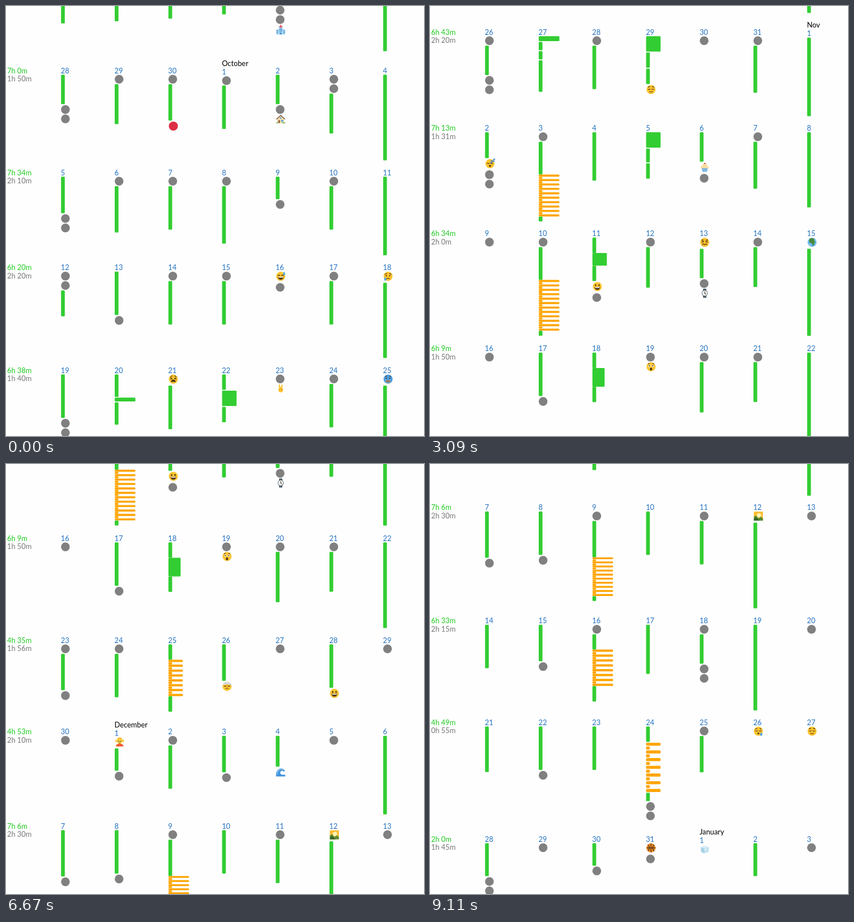
Animation, 738 px wide and 759 px high, one loop 9.21 s. Source, as an HTML page:

```html
<!DOCTYPE html>
<html lang="en">
<head>
<meta charset="utf-8">
<title>Training calendar</title>
<style>
  html, body { margin: 0; width: 100%; height: 100%; overflow: hidden; background: #fefefe; }
  svg { display: block; width: 738px; height: 759px; }
  text { font: 12.8px Lato, sans-serif; fill: #000; }
  .total { fill: #1fcb1f; }
  .extra { fill: #777; }
  .day { fill: #2472c0; }
  .run { fill: #32cd32; }
  .interval { fill: #ffa500; }
  .dot { fill: #808080; }
  .red { fill: #dd2e44; }
  .ink { fill: none; stroke: #4a2f12; stroke-width: 1.1; stroke-linecap: round; stroke-linejoin: round; }
  .mouth { fill: #4a2f12; }
  .drop { fill: #4aa5ee; }
</style>
</head>
<body>
<svg viewBox="0 0 738 759"><g id="calendar"></g></svg>
<script>
const LOOP = 9210;
const COLUMN_X = 97.2, COLUMN_STEP = 94.78;
const BAR_WIDTH = 6.6, GAP = 1.4;

// Each row: y | run total | extra total | first day | seven cells.
// In a cell: minutes[*width], a trailing "-" drops the gap,
// count~pitch~width is a stack of intervals, words are symbols.
const weeks = `
-70||||73.5,70.5,66.5,60.5,47 dot dot hospital,,113
114|7h 0m|1h 50m|28|40 dot dot,dot 55,dot 50 red,dot 60,40 dot house,dot dot 55,120
294|7h 34m|2h 10m|5|50 dot dot,dot 64,dot 60,dot 80,30 dot,dot 60,110
461.5|6h 20m|2h 20m|12|dot dot 35,60 dot,dot 60,dot 60,sweat dot,dot 60,sad 105
643|6h 38m|1h 40m|19|60 dot dot,30 3.5*36.5 30,tired 60,20 20*25.5 20,dot peace,dot 60,cold 95
824|6h 43m|2h 20m|26|dot 40 dot dot,5*36.5 10 10 43,dot 60,20*25.5 20 20 calm,dot,dot 65,110
993.5|7h 13m|1h 31m|2|35 sleep dot dot,dot 45- 10~3.9~36.5 5,67,20*25.5 18 20,40 cupcake dot,dot 65,105
1179.5|6h 34m|2h 0m|9|dot,dot 45- 12~3.9~36.5 5,20- 16*25.5- 20 grin dot,dot 56,upset 40 dot watch,dot 55,globe 122
1382.5|6h 9m|1h 50m|16|dot,60 dot,20- 24.7*21.5- 20,dot gasp,dot 70,dot 55,120
1562.5|4h 35m|1h 56m|23|dot 50 dot,dot 60,20- 8~4.3~25.5 20,50 hurt,dot,60 grin,dot
1724|4h 53m|2h 10m|30|dot,massage 30 dot,dot 60,50 dot,42 wave,dot,110
1890.5|7h 6m|2h 30m|7|64 dot,60 dot,dot 50- 10~3.6~36.5 5,60,dot 60,sunrise 120,dot
2090.5|6h 33m|2h 15m|14|60,50 dot,dot 20- 8~4.3~36.5 20,68,dot 40 dot dot,120,dot
2270|4h 49m|0h 55m|21|63,60 dot,60,20 7~6.8~25.5 10 dot dot,dot 50,weary,calm
2476|2h 0m|1h 45m|28|45 dot dot,dot,30 dot,ball dot,ice,45,dot`.trim().split("\n");

const months = [["September", 30], ["October", 31], ["Nov", 30], ["December", 31], ["January", 31]];

const ink = d => `<path class="ink" d="${d}"/>`;
const mouth = (y, rx, ry) => `<ellipse class="mouth" cy="${y}" rx="${rx}" ry="${ry}"/>`;
const eyes = (y, rx, ry) => [-3, 3].map(x => `<ellipse class="mouth" cx="${x}" cy="${y}" rx="${rx}" ry="${ry}"/>`).join("");
const shape = (fill, d) => `<path fill="${fill}" d="${d}"/>`;
const drop = (x, y) => `<path class="drop" d="M${x} ${y}q4 5 0 6.5q-4-1.5 0-6.5"/>`;
const face = (parts, fill = "#fcc531") =>
  `<circle r="8" fill="${fill}"/><path d="M-6.9 4a8 8 0 0 0 13.8 0a9 9 0 0 1-13.8 0" fill="#e59d20" opacity=".5"/>${parts}`;
const grinMouth = '<path class="mouth" d="M-5 .8H5Q4.4 5.8 0 5.8T-5 .8"/><path fill="#fff" d="M-4.2 1H4.2L3.8 2.5H-3.8z"/>';
const shutEyes = ink("M-5-.8q1.8 1.5 3.6 0M1.4-.8q1.8 1.5 3.6 0");
const squint = ink("M-5-2.5l3 1.5l-3 1.3M5-2.5l-3 1.5l3 1.3");

const symbols = {
  dot: '<circle class="dot" cx="-1" cy="-.3" r="7.7"/>',
  red: '<circle class="red" r="8"/>',
  sweat: face(ink("M-5-1q1.8-2.4 3.6 0M1.4-1q1.8-2.4 3.6 0") + grinMouth + drop(6, -8)),
  sad: face(eyes(-1, 1, 1.3) + ink("M-5.5-3.6l3-1.4M5.5-3.6l-3-1.4M-2.4 4.6q2.4-2.4 4.8 0") + drop(-5, 1.5)),
  tired: face(squint + ink("M-5-4.5l3-1M5-4.5l-3-1") + '<path class="mouth" d="M-4 5.5q0-4.5 4-4.5t4 4.5q-4-1.5-8 0"/>'),
  upset: face(squint + ink("M-5-4.5l3 1M5-4.5l-3 1M-4 4.5l2-2l2 2l2-2l2 2")),
  cold: face(eyes(-1.5, 1, 1.2) + '<rect x="-4" y="1.5" width="8" height="4" rx="1" fill="#fff"/>' +
    ink("M-4 3.5H4M-1.5 1.5V5.5M1.5 1.5V5.5M-5-4.5l2.5-.8M5-4.5l-2.5-.8"), "#4b9de2"),
  calm: face(shutEyes + ink("M-5-4q1.5-1.4 3-.8M5-4q-1.5-1.4-3-.8M-2.8 3.5q2.8 2 5.6 0")),
  sleep: face(shutEyes + mouth(4, 1.8, 1.8)) +
    '<path d="M1-5h3l-3 3.5h3M5-8h3.5L5-4h3.5" fill="none" stroke="#3f7fc4" stroke-width="1.3"/>',
  grin: face(eyes(-2.3, 1.1, 1.9) + grinMouth),
  gasp: face('<g fill="#fff"><circle cx="-3" cy="-1.5" r="2"/><circle cx="3" cy="-1.5" r="2"/></g>' +
    eyes(-1.5, 1.1, 1.1) + ink("M-5-4.7l2-1M5-4.7l-2-1") + mouth(4, 2, 2.5)),
  hurt: face(shutEyes + ink("M-2 4q2-1.2 4 0")) +
    shape("#d9dde0", "M-7.8-2A8 8 0 0 1 7.8-2Q0-5-7.8-2") + shape("#b9c0c5", "M-6-4.5Q1-6 7.5-2.7L7.9-1.8Q0-5-6-4.5"),
  weary: face(shutEyes + ink("M-5-3.5l2.5-1.2M5-3.5l-2.5-1.2") + mouth(4, 1.7, 1.4) + drop(5, 2)),
  massage: shape("#f4582e", "M-7 8q1-5 7-5t7 5z") + shape("#f7b52c", "M-5-2Q-5-8 0-8T5-2L4 1H-4z") +
    '<ellipse cy="-1" rx="4" ry="4.8" fill="#ffd54a"/>' + ink("M-2.6-1.2h1.6M1-1.2h1.6M-1 1.8h2") +
    shape("#fcc531", "M-8-4l3 1v3l-2 1zM8-4l-3 1v3l2 1z"),
  peace: shape("#fcc531", "M-3.6-6.8l1.8-.6L0-1.5L1.8-7.4l1.8.5L2.6-.5L4.5 1.5L3.2 6.5H-2.6L-4.6 2.5L-3-1z") +
    '<path d="M-3 1.2L1 .6L.5 3.5M2.5 0V3" fill="none" stroke="#dc9620" stroke-width=".8"/>',
  house: shape("#f4dfae", "M-6-1L0-6.5L6-1V7H-6z") + shape("#7d573d", "M-8 0L0-7.5L8 0L7 1L0-5.5L-7 1z") +
    shape("#9b6b45", "M-4.5 2h3.5v5h-3.5z") + shape("#56a6d8", "M1 1.5h3.5V4.5H1zM-1.4-3h2.8v2.4h-2.8z") +
    shape("#65a845", "M-8 6h3v1.5h-3zM2 6h6v1.5H2z"),
  hospital: '<g transform="translate(0 1.4)">' + shape("#a8d4f1", "M-3.5-6h7V8h-7zM-8-1h16V8H-8z") +
    shape("#3f8fd0", "M-7 1h2v1.6h-2zM-7 4h2v1.6h-2zM5 1h2v1.6H5zM5 4h2v1.6H5zM-2.5-2h5v1.4h-5zM-2.5 1h5v1.4h-5zM-1.5 4.5h3V8h-3z") +
    shape("#e34355", "M-.8-9h1.6v2h2v1.5h-2v2H-.8v-2h-2V-7h2z") + "</g>",
  cupcake: shape("#62a8db", "M-5.5 1H5.5L4 8H-4z") + shape("#f7dfa4", "M-7 2q-1-3 2-4q0-3 3-4q2-4 4 0q3 1 3 4q3 1 2 4z") +
    shape("#db4c4c", "M-1-7.5h2.5v2H-1z") + '<path d="M-3 3v4M0 3v5M3 3v4" stroke="#c6e4f7" stroke-width=".9"/>',
  globe: '<circle r="8" fill="#6db9ee"/>' +
    shape("#478a3c", "M-4-6.5Q1-8.5 4-5.5L3.5-3L6-1L4 1L3.2 5L1.2 6.8L0 2L-4 .8L-5.5-2.5z") + shape("#a9dbf6", "M-7 2l3 2v2zM5-4l2 2l-1 1z"),
  watch: shape("#4c5962", "M-2.7-8h5.4l.6 5h-6.6zM-3.3 3h6.6l-.6 5h-5.4z") +
    '<circle r="4.8" fill="#f5f7f8" stroke="#8b989f" stroke-width="1.3"/>' + ink("M0-2.6V0L1.8 1.4"),
  wave: shape("#3f92dc", "M-8 7.5Q-9-1-4-5Q2-9 6.5-4Q8-1 5-1.2Q2-4-.5-1Q-2 4 3 4.5H8V7.5z") +
    '<path d="M-5.5 4Q-6-1-2.5-4T5-3.5" fill="none" stroke="#9bd2f7" stroke-width="1.2"/>',
  sunrise: '<rect x="-8" y="-8" width="16" height="16" rx="1" fill="#fbbd32"/><circle cx="1" cy="-1.5" r="3.8" fill="#fff3b3"/>' +
    shape("#5c8b34", "M-8 1L-4-1L0 4L4 1L8 4V8H-8z") + shape("#386829", "M-8 5L-4 2L2 8H-8z"),
  ball: '<circle r="8" fill="#f28a20"/><path d="M0-8V8M-8 0H8M-5.4-5.8Q-.6 0-5.4 5.8M5.4-5.8Q.6 0 5.4 5.8" fill="none" stroke="#3c2a20" stroke-width="1.1"/>',
  ice: shape("#d7eef8", "M-7-4L1-6.5L7.5-4L-1-1.5z") + shape("#a9d2e7", "M-7-4L-1-1.5V7.5L-6.5 4.5z") +
    shape("#c0e1f0", "M-1-1.5L7.5-4L7 4.5L-1 7.5z") + shape("#edf8fc", "M0 0L3.5-1L2 3z")
};

const height = minutes => 1.24 * minutes + 2.4;
const text = (x, y, kind, value) => `<text x="${x}" y="${y + 4.6}" class="${kind}">${value}</text>`;
const box = (x, y, w, h, kind) =>
  `<rect x="${x}" y="${y}" width="${w}" height="${h}" rx="${Math.min(1.5, h / 2)}" class="${kind}"/>`;

function stack(x, y, count, pitch, width) {
  const thick = pitch > 6 ? 5.4 : pitch - 0.3;
  return Array.from({ length: 2 * count - 1 }, (_, i) =>
    box(x, y + i * pitch, i % 2 ? BAR_WIDTH : width, thick, "interval")).join("");
}

function cell(x, top, tokens) {
  let y = top, out = "";
  for (const token of tokens.split(" ").filter(Boolean)) {
    if (token in symbols) {
      const round = token === "dot";
      out += `<g transform="translate(${x + 8.7} ${y + 8.3})">${symbols[token]}</g>`;
      y += round ? 16.6 : 19.8;
    } else if (token.includes("~")) {
      const [count, pitch, width] = token.split("~").map(Number);
      out += stack(x, y, count, pitch, width);
      y += (2 * count - 1) * pitch;
    } else {
      const [minutes, width = BAR_WIDTH] = token.replace("-", "").split("*").map(Number);
      out += box(x, y, width, height(minutes), "run");
      y += height(minutes) + (token.endsWith("-") ? 0 : GAP);
    }
  }
  return out;
}

let month = 0;
function week(line) {
  const [yText, total, extra, first, cells] = line.split("|");
  const rowY = Number(yText);
  let day = Number(first);
  let out = text(2, rowY, "total", total) + text(2, rowY + 14.7, "extra", extra);
  cells.split(",").forEach((tokens, i) => {
    const x = COLUMN_X + i * COLUMN_STEP;
    let y = rowY;
    if (first) {
      if (day > months[month][1]) {
        day = 1;
        y += 2.4;
        out += text(x - 0.4, y - 14.6, "month", months[++month][0]);
      }
      out += text(x - 0.4, y, "day", day++);
    }
    out += cell(x, y + 7.3, tokens);
  });
  return out;
}

const calendar = document.getElementById("calendar");
calendar.innerHTML = weeks.map(week).join("");

// Bursts of scroll steps: first time, last time, count.
const bursts = [[300, 1330, 8], [1480, 2510, 8], [2650, 3090, 4], [3390, 3390, 1], [3690, 4280, 5],
  [4580, 4730, 2], [5020, 5920, 4], [6220, 7260, 8], [7430, 8330, 7], [8480, 9110, 5]];
const stepTimes = bursts.flatMap(([from, to, n]) =>
  Array.from({ length: n }, (_, i) => Math.round((from + (to - from) * i / Math.max(1, n - 1)) / 10) * 10));

// Step count and the scroll offset reached there.
const stops = [[0, 0], [13, 498], [20, 778], [21, 779.5], [29, 971.5], [30, 973], [31, 1004],
  [32, 1013], [36, 1251.5], [45, 1534], [52, 1814]];

function offsetAt(step) {
  const next = Math.max(1, stops.findIndex(([n]) => n >= step));
  const [a, from] = stops[next - 1], [b, to] = stops[next];
  return Math.round(2 * (from + (to - from) * (step - a) / (b - a))) / 2;
}

function draw(now) {
  const time = now % LOOP;
  const step = stepTimes.filter(t => t <= time).length;
  calendar.setAttribute("transform", `translate(0 ${-offsetAt(step)})`);
  requestAnimationFrame(() => draw(performance.now()));
}
draw(performance.now());
</script>
</body>
</html>
```
